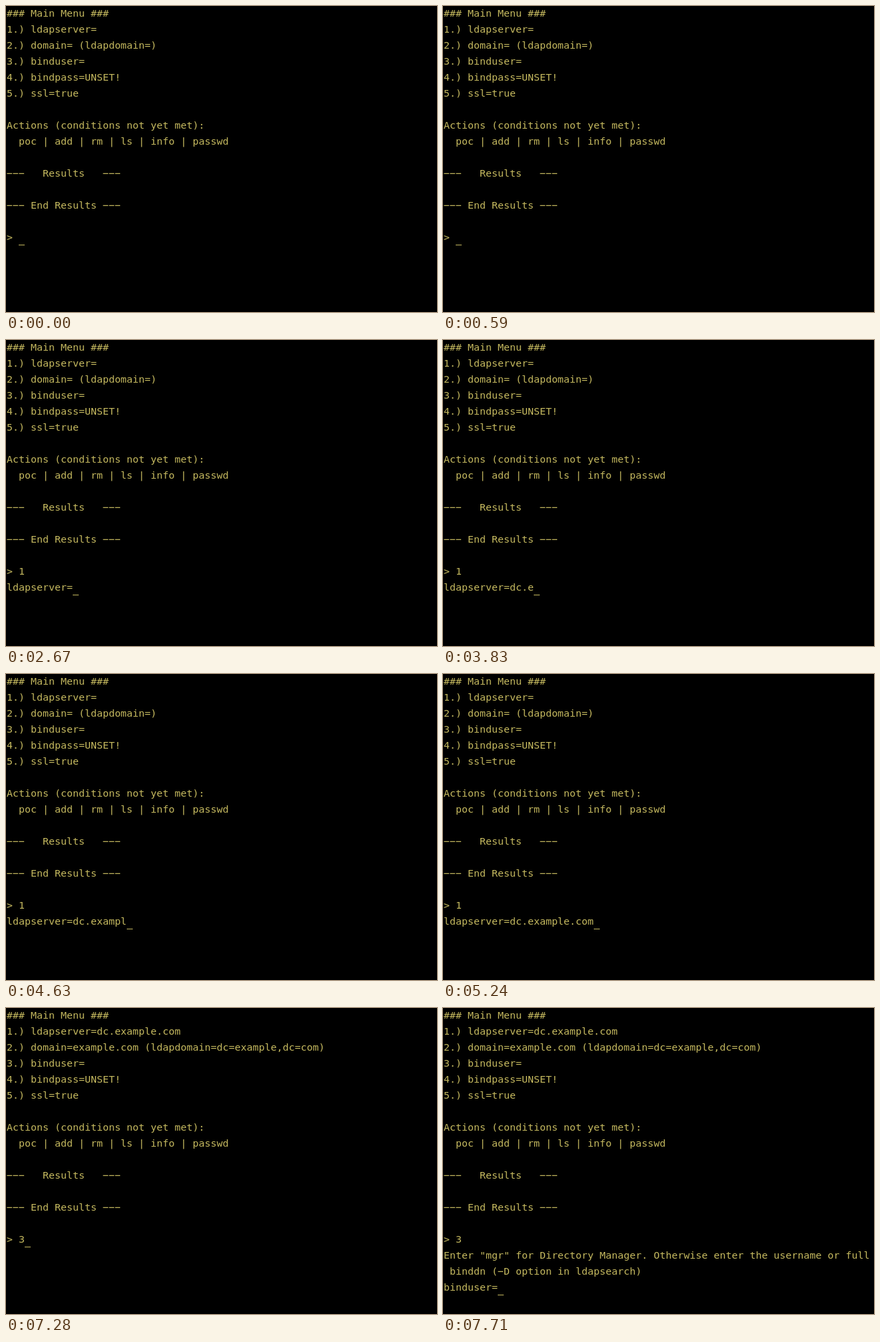
These frames come from a looping animation (646x459 px, 8 s). An HTML page:

```html
<!DOCTYPE html>
<html lang="en">
<meta charset="utf-8">
<title>LDAP menu</title>
<style>
  html, body { margin: 0; height: 100%; overflow: hidden; background: #000; }
  pre {
    position: absolute; left: 1px; top: -1px; margin: 0;
    font: 14.95px/24px "DejaVu Sans Mono", monospace; color: #c5b95f;
  }
  #cursor { position: absolute; width: 9px; height: 1px; background: #c5b95f; }
</style>
<pre id="text"></pre>
<div id="cursor"></div>
<script>
const LOOP = 8000, COL = 9, ROW = 24;
const text = document.getElementById('text');
const cursor = document.getElementById('cursor');

const menu = (server, domain, base) => `### Main Menu ###
1.) ldapserver=${server}
2.) domain=${domain} (ldapdomain=${base})
3.) binduser=
4.) bindpass=UNSET!
5.) ssl=true

Actions (conditions not yet met):
  poc | add | rm | ls | info | passwd

−−−   Results   −−−

−−− End Results −−−

> `;

const server = 'dc.example.com';
const keyTimes = [3060, 3210, 3560, 3830, 3980, 4110, 4250,
                  4450, 4570, 4700, 4850, 5010, 5150, 5240];
const bindPrompt = `
Enter "mgr" for Directory Manager. Otherwise enter the username or full
 binddn (−D option in ldapsearch)
binduser=`;

function screenAt(t) {
  if (t < 5550) {
    const typed = server.slice(0, keyTimes.filter(k => k <= t).length);
    return menu('', '', '') + (t >= 2320 ? '1' : '') +
      (t >= 2540 ? '\nldapserver=' + typed : '');
  }
  return menu(server, 'example.com', 'dc=example,dc=com') +
    (t >= 7140 ? '3' : '') + (t >= 7710 ? bindPrompt : '');
}

const between = (t, from, to) => t >= from && t < to;
let shown;

function draw(now) {
  const t = now % LOOP;
  const screen = screenAt(t);
  if (screen !== shown) {
    text.textContent = shown = screen;
    const lines = screen.split('\n');
    cursor.style.left = 1 + lines.at(-1).length * COL + 'px';
    cursor.style.top = (lines.length - 1) * ROW + 22 + 'px';
  }
  cursor.hidden = between(t, 1140, 1720) || between(t, 6620, 7000);
  requestAnimationFrame(draw);
}
draw(performance.now());
</script>
</html>
```
